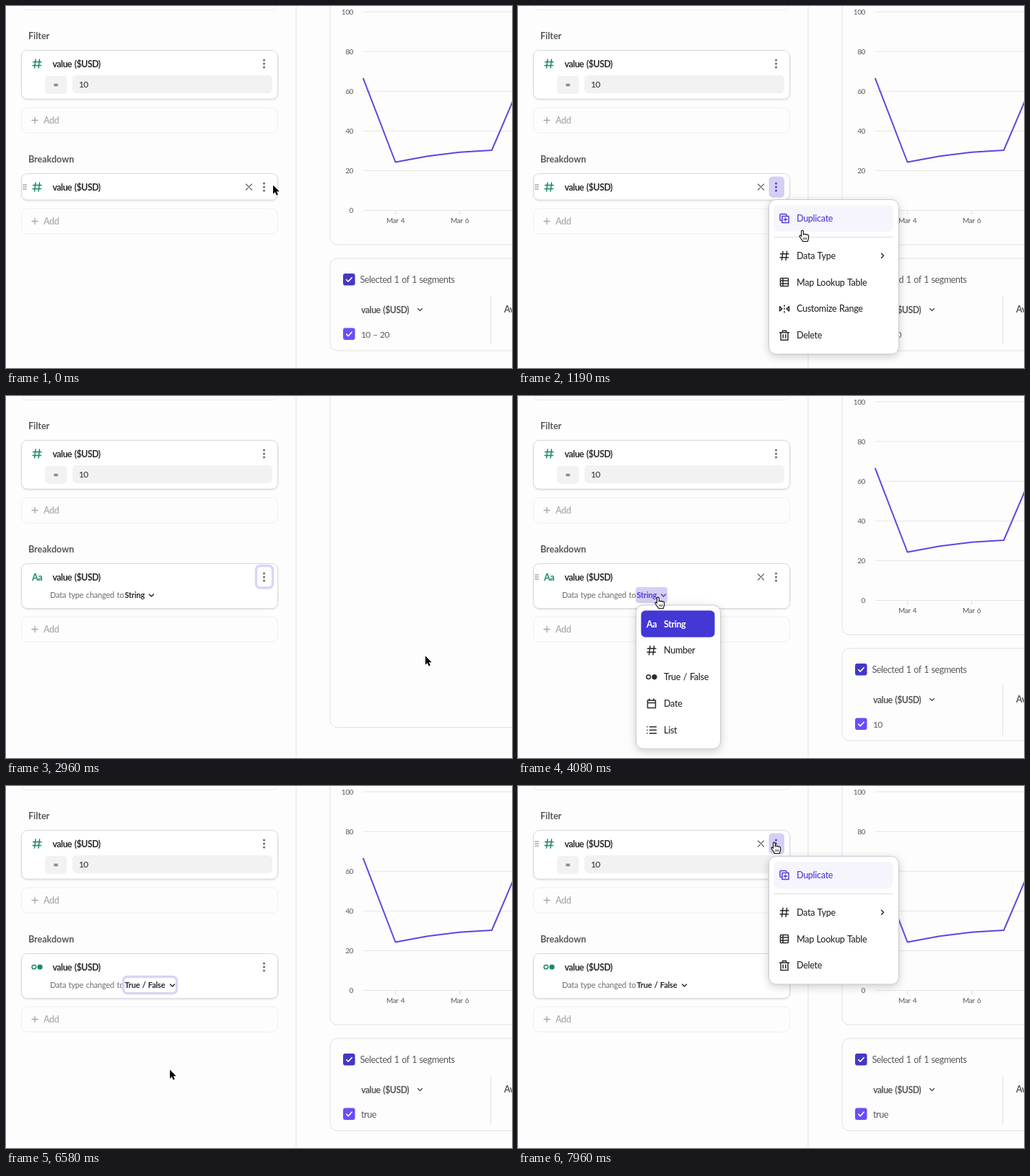
Animation, 701 px wide and 502 px high, one loop 8 s. Source, as an HTML page:

```html
<!DOCTYPE html>
<html lang="en">
<head>
<meta charset="utf-8">
<title>Breakdown data type</title>
<style>
html, body { margin: 0; width: 100%; height: 100%; overflow: hidden; background: #fdfdfd; }
svg { display: block; position: absolute; left: 0; top: 0; }
text { font: 12.5px Lato, "Open Sans", sans-serif; letter-spacing: -.4px; word-spacing: .8px; fill: currentColor; }
.bold { font-weight: 700; }
.head { font-weight: 700; letter-spacing: 0; }
.name { font-size: 12.3px; font-weight: 700; letter-spacing: -.5px; word-spacing: 1.2px; }
.item { font-weight: 500; letter-spacing: -.28px; }
.number { font-size: 12px; letter-spacing: -.6px; word-spacing: 1px; }
.small { font-size: 11px; letter-spacing: -.2px; }
.axis { font-size: 10px; letter-spacing: -.4px; word-spacing: 1.2px; }
.end { text-anchor: end; }
.mid { text-anchor: middle; }
.line { fill: none; stroke: currentColor; stroke-width: 1.5; stroke-linecap: round; stroke-linejoin: round; }
.card { filter: drop-shadow(0 1px 1px #0000001c); }
.menu { filter: drop-shadow(0 3px 6px #00000030); }
</style>
</head>
<body>
<svg width="701" height="502" viewBox="0 0 701 502">
  <g id="scene"></g>
  <g id="cursor"></g>
</svg>
<script>
const LOOP = 8000;
const PURPLE = '#4f3fd6', LILAC = '#d5cff4', RING = '#d9d5f6', GREEN = '#168a60', INK = '#2b2b2f', GREY = '#58585c';

// Pointer stops: time, x, y
const stops = [
  [0, 370, 248.5], [320, 358, 250], [650, 358, 250], [1190, 394, 311], [1480, 425, 344],
  [1680, 470, 346], [1960, 562, 347], [2150, 581, 360.5], [2960, 581, 360.5], [3600, 200, 277],
  [3780, 194, 279], [4450, 194, 279], [5100, 219, 422], [5350, 219, 422], [5700, 227, 393.5],
  [6650, 227, 393.5], [7400, 355, 78], [LOOP, 355, 78]
];

const text = (x, y, s, color = INK, cls = '') =>
  `<text x="${x}" y="${y}" class="${cls}" color="${color}">${s}</text>`;
const rect = (x, y, w, h, r, fill, stroke = 'none', extra = '') =>
  `<rect x="${x}" y="${y}" width="${w}" height="${h}" rx="${r}" fill="${fill}" stroke="${stroke}" ${extra}/>`;
const line = (d, color, width = 1.5) =>
  `<path class="line" d="${d}" color="${color}" style="stroke-width:${width}"/>`;
const at = (x, y, body, color = INK) =>
  `<g transform="translate(${x} ${y})" color="${color}">${body}</g>`;
const stroke = d => `<path class="line" d="${d}"/>`;

const icons = {
  hash: stroke('M-2-6L-3.5 6M3.5-6L2 6M-5.5-2.5H6M-6 2.5H5.5'),
  text: '<text class="mid bold" y="4.5">Aa</text>',
  bool: stroke('M-7 0a2.8 2.8 0 1 0 5.6 0a2.8 2.8 0 1 0-5.6 0') + '<circle cx="4" r="3.6" fill="currentColor"/>',
  date: stroke('M-5.5-4.5H5.5V6H-5.5ZM-5.5-1H5.5M-3-6.5V-4M3-6.5V-4'),
  list: stroke('M-2.5-4.5H6.5M-2.5 0H6.5M-2.5 4.5H6.5M-6-4.5h.2M-6 0h.2M-6 4.5h.2'),
  copy: stroke('M-3-3H6V6H-3ZM1.5-.5V3.5M-.5 1.5H3.5M-3 3H-4.5Q-6 3-6 1.5V-4.5Q-6-6-4.5-6H1.5Q3-6 3-4.5V-3'),
  table: stroke('M-4.5-5.5H4.5Q5.5-5.5 5.5-4.5V4.5Q5.5 5.5 4.5 5.5H-4.5Q-5.5 5.5-5.5 4.5V-4.5Q-5.5-5.5-4.5-5.5M-5.5-2H5.5M-5.5 2H5.5M-2-5.5V5.5'),
  range: stroke('M-6.5-3V3L-3 0ZM6.5-3V3L3 0ZM0-5V-3.5M0-.7V.7M0 3.5V5'),
  trash: stroke('M-6.5-4H6.5M-5-4V6.5H5V-4M-2.5-4V-6.5H2.5V-4M-1.8-1V3.5M1.8-1V3.5')
};
const chevron = (x, y, color) => line(`M${x - 3} ${y - 1.5}l3 3l3-3`, color);

const typeItems = [['text', 'String'], ['hash', 'Number'], ['bool', 'True / False'], ['date', 'Date'], ['list', 'List']];
const actions = [['copy', 'Duplicate'], ['hash', 'Data Type'], ['table', 'Map Lookup Table'],
  ['range', 'Customize Range'], ['trash', 'Delete']];
const menus = [
  { from: 480, to: 2250, x: 347.5, y: 268.5, w: 180, gap: 15, items: actions, first: 0 },
  { from: 1520, to: 2250, x: 528.5, y: 320.5, w: 118, gap: 0, items: typeItems, picked: 1 },
  { from: 3850, to: 5800, x: 163.5, y: 290, w: 117, gap: 0, items: typeItems, picked: 0 },
  { from: 7650, to: LOOP, x: 347.5, y: 97.5, w: 180, gap: 15, items: actions.filter(a => a[0] !== 'range'), first: 0 }
];
const itemY = (m, i) => m.y + 26 + i * 36.8 + (i ? m.gap : 0);
const within = (t, a, b) => t >= a && t < b;
const inside = (p, x, y, w, h) => p.x >= x && p.x <= x + w && p.y >= y && p.y <= y + h;

function pointer(t) {
  const i = stops.findIndex(s => s[0] > t);
  const [t0, x0, y0] = stops[i - 1], [t1, x1, y1] = stops[i];
  const u = (t - t0) / (t1 - t0), k = u * u * (3 - 2 * u);
  return { x: x0 + (x1 - x0) * k, y: y0 + (y1 - y0) * k };
}

function drawMenu(m, hover) {
  const last = itemY(m, m.items.length - 1);
  let out = rect(m.x, m.y, m.w, last + 26 - m.y, 10, '#fff', '#cacad0', 'class="menu"');
  if (m.gap) out += line(`M${m.x + 7.5} ${m.y + 52}h${m.w - 15}`, '#dedee2', 1);
  m.items.forEach(([icon, label], i) => {
    const y = itemY(m, i), picked = i === m.picked, on = i === hover;
    const color = picked ? '#fff' : on ? PURPLE : INK;
    if (picked || on) out += rect(m.x + 7, y - 18.5, m.w - 15, 37, 6, picked ? '#4337d6' : '#f6f5fd');
    out += at(m.x + 21.5, y, icons[icon], color) + text(m.x + 38.5, y + 4.5, label, color, picked ? 'bold' : 'item');
    if (label === 'Data Type') out += line(`M${m.x + 156} ${y - 3}l3 3l-3 3`, INK);
  });
  return out;
}

function dots(y, active, ring) {
  let out = '';
  if (active) out += rect(347.5, y - 14.5, 21.5, 29, 5, LILAC);
  if (ring) out += rect(346.5, y - 15.5, 23, 30.5, 5.5, '#fff', RING, 'stroke-width="3.5"');
  for (const d of [-5, 0, 5]) out += `<circle cx="357.5" cy="${y + d}" r="1.5" fill="${active ? PURPLE : '#68686c'}"/>`;
  return out;
}

function card(y, h, cy, icon, hovered, active, ring) {
  let out = rect(21.5, y, 355, h, 8, '#fff', '#d9d9dc', 'class="card"');
  out += at(43, cy, icons[icon], GREEN) + text(64.5, cy + 4.5, 'value ($USD)', INK, 'name');
  if (hovered) {
    out += line(`M23.5 ${cy - 3}h5m-5 3h5m-5 3h5`, '#808084', 1);
    out += line(`M332.5 ${cy - 4}l8 8m0-8l-8 8`, '#68686c', 1.3);
  }
  return out + dots(cy, active, ring);
}

const add = y => rect(21.5, y, 355, 35, 8, 'none', '#f0f0f1') +
  line(`M36 ${y + 17.5}h8m-4-4v8`, '#a6a6aa', 1.3) + text(52, y + 22, 'Add', '#a6a6aa', 'item');
const check = (y, fill) => rect(467, y, 16.5, 16.5, 3, fill) + line(`M471.5 ${y + 8.5}l2.6 2.6l5-5.4`, '#fff', 1.6);

function chart(segment) {
  let out = rect(449, -30, 290, 361, 10, 'none', '#e2e2e5');
  for (let i = 0; i < 6; i++) {
    const y = 283.5 - i * 55.1;
    out += line(`M495 ${y}H701`, '#e6e6e8', 1) + text(481, y + 3.8, i * 20, GREY, 'axis end');
  }
  [[539.5, 4], [628.5, 6]].forEach(([x, day]) => {
    out += line(`M${x} 284v5`, '#e0e0e3', 1) + text(x, 300.5, 'Mar ' + day, GREY, 'axis mid');
  });
  out += line('M495 100.7L539.5 216.5L584 208.2L628.5 202.8L673 200L717.5 96', '#5b49df', 2);
  out += rect(449, 350, 290, 128, 10, 'none', '#e2e2e5');
  out += check(371, '#4337c8') + text(490.5, 383.5, 'Selected 1 of 1 segments', GREY);
  out += text(492, 425.5, 'value ($USD)', GREY, 'name') + chevron(573.5, 421, GREY);
  out += line('M671.5 401V470', '#e2e2e5', 1) + text(690, 424.5, 'Average', GREY, 'bold');
  return out + check(446.5, '#6a4cfa') + text(492, 459.5, segment, GREY, segment === 'true' ? '' : 'number');
}

function scene(t, p) {
  const open = menus.map(m => within(t, m.from, m.to));
  const hits = menus.map((m, k) => !open[k] ? -1 : m.items.findIndex((_, i) =>
    inside(p, m.x + 7, itemY(m, i) - 18.5, m.w - 15, 37)));
  const anyOpen = open.some(Boolean);
  const changed = t >= 2250, bool = t >= 5800, h = changed ? 62 : 36.5;
  const dots1 = open[3] || !anyOpen && inside(p, 347, 65, 22, 30);
  const dots2 = open[0] || !anyOpen && inside(p, 347, 236, 22, 30);
  const width = bool ? 74 : 44;
  const overLink = changed && inside(p, 163, 265, width, 22);
  const link = open[2] || !anyOpen && overLink;
  const hover1 = open[3] || !anyOpen && inside(p, 21, 61, 356, 68);
  const hover2 = open[0] || open[2] || !anyOpen && inside(p, 21, 232, 356, h);

  let out = rect(21.5, -30, 355, 35.5, 8, 'none', '#ececee') + line('M402 0V502', '#e3e3e5', 1);
  out += text(31, 46, 'Filter', GREY, 'head') + card(61.5, 67.5, 80, 'hash', hover1, dots1, false);
  out += rect(54, 97, 30.5, 25, 5, '#f2f2f3') + text(69, 113.5, '=', INK, 'mid');
  out += rect(92, 96, 277, 25, 6, '#f2f2f3') + text(101, 113, '10', INK, 'number') + add(141);

  out += text(31, 217, 'Breakdown', GREY, 'head');
  out += card(232.5, h, 251, bool ? 'bool' : changed ? 'text' : 'hash', hover2, dots2, within(t, 2250, 3850));
  if (changed) {
    const color = link ? PURPLE : INK;
    out += text(61, 280, 'Data type changed to', '#6c6c70', 'small');
    if (within(t, 5800, 7650)) out += rect(162.5, 264.5, 74, 23, 5.5, '#fff', RING, 'stroke-width="3.5"');
    if (link) out += rect(163, 265, width, 22, 4, LILAC);
    out += text(164.5, 280, bool ? 'True / False' : 'String', color, 'small bold');
    out += chevron(bool ? 230.5 : 201.5, 276.5, color);
  }
  out += add(changed ? 306 : 281);

  const loading = within(t, 2290, 3250) || within(t, 5850, 6370);
  out += loading ? rect(449, -30, 290, 489.5, 10, 'none', '#e2e2e5')
    : chart(bool ? 'true' : changed ? '10' : '10 – 20');

  menus.forEach((m, k) => {
    if (!open[k]) return;
    const hover = k === 0 && open[1] ? 1 : hits[k] < 0 ? m.first : hits[k];
    out += drawMenu(m, hover);
  });
  const hand = hits.some(i => i >= 0) || overLink || inside(p, 347, 65, 22, 30) || inside(p, 347, 236, 22, 30);
  return { out, hand };
}

const arrowShape = '<path transform="scale(.87)" d="M0 0V14L3.2 11L5.4 16L7.8 15L5.6 10.1H10Z" fill="#000" stroke="#fff" stroke-width="1" paint-order="stroke"/>';
const handShape = '<path d="M-1.5 8.5V1.5a1.4 1.4 0 0 1 2.8 0V6c0-1.3 2.6-1.3 2.6.2c0-1.2 2.5-1 2.5.5c0-1.2 2.2-.9 2.2.8v3.5' +
  'c0 2-1.2 2.6-1.2 4.5h-7c-.5-2.2-3.2-4.5-4.3-6.8c-.8-1.6 1.2-2.2 2.4-.7Z" fill="#fff" stroke="#111" stroke-width="1.1" stroke-linejoin="round"/>' +
  '<path d="M1.8 10v3M3.8 10v3M5.8 10v3" stroke="#111" stroke-width=".8"/>';

const sceneEl = document.getElementById('scene'), cursorEl = document.getElementById('cursor');
let shown = '', shownHand = null;

function draw(now) {
  const t = now % LOOP, p = pointer(t), { out, hand } = scene(t, p);
  if (out !== shown) sceneEl.innerHTML = shown = out;
  if (hand !== shownHand) cursorEl.innerHTML = (shownHand = hand) ? handShape : arrowShape;
  cursorEl.setAttribute('transform', `translate(${p.x.toFixed(2)} ${p.y.toFixed(2)})`);
}

const start = performance.now();
function tick() {
  draw(performance.now() - start);
  requestAnimationFrame(tick);
}
tick();
</script>
</body>
</html>
```
